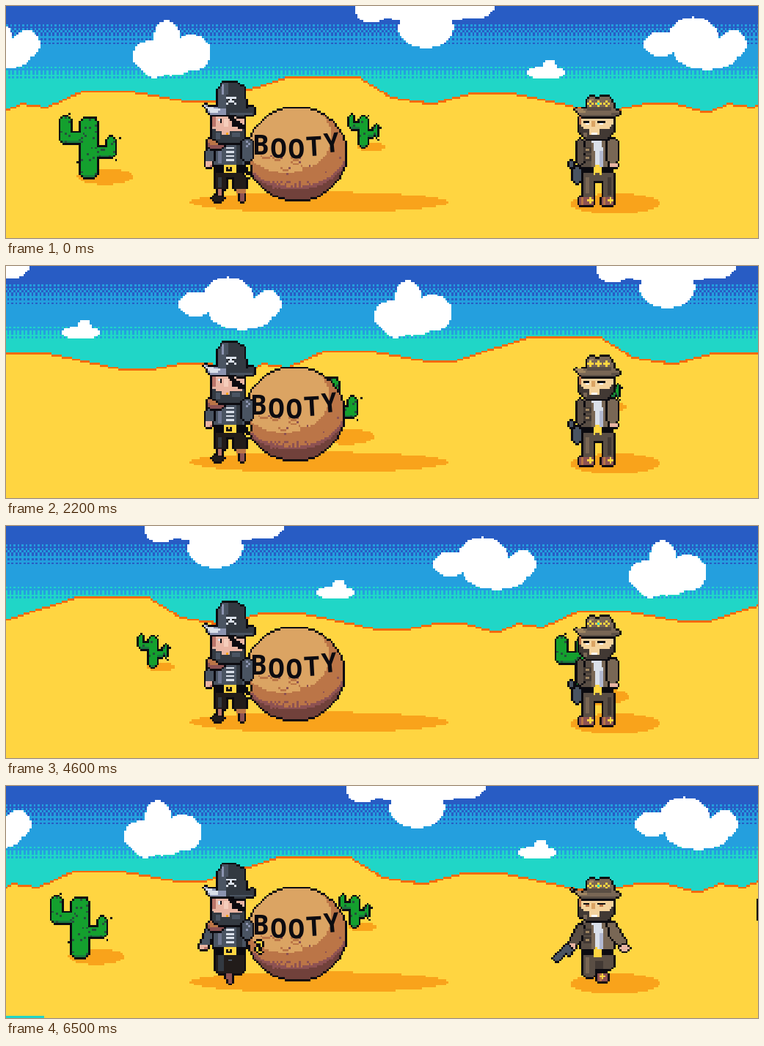
Recreate the animation shown at these times as an HTML page with a canvas. Size 1025 px wide and 317 px high, loop 6.52 s.

```html
<!DOCTYPE html>
<html lang="en">
<head>
<meta charset="utf-8">
<title>Desert walk</title>
<style>
html, body { margin: 0; width: 100%; height: 100%; overflow: hidden; background: #ffd541; }
canvas { display: block; width: 1025px; height: 317px; }
</style>
</head>
<body>
<canvas id="stage" width="1025" height="317"></canvas>
<script>
const LOOP = 6520, STEP = 100, PERIOD = 963;
const TILE_W = 350, S = PERIOD / TILE_W, W = 373, H = 116;   // art grid, S stage pixels per cell
const INK = '#0c0b10', SAND = '#ffd541', SHADE = '#f9a31b', TEAL = '#20d6c7';
const BLUE = '#249fde', NAVY = '#285cc4', SKIN = '#e9b5a3', BLUSH = '#ba756a', WHITE = '#fff';
const SLATE = '#4a5462', COAL = '#333941', STEEL = '#8b93af', PALE = '#dae0ea', PITCH = '#221c1a';
const COAT = '#5a4e44', UMBER = '#423934', TAN = '#796755', BUFF = '#a08662';
const WOOD = '#bb7547', LIGHT = '#dba463', RUST = '#8e5252', DARK = '#71413b';

const ctx = document.getElementById('stage').getContext('2d');
ctx.imageSmoothingEnabled = false;

let g, ox = 0, oy = 0;   // current layer and drawing offset in stage pixels
let seed = 7;
const rand = (lo, hi) => {
  seed = seed * 16807 % 2147483647;
  return lo + (hi - lo) * seed / 2147483647;
};

function layer() {
  const c = document.createElement('canvas');
  c.width = W;
  c.height = H;
  return c.getContext('2d');
}

function sprite(draw) {
  g = layer();
  ox = oy = 0;
  draw();
  return g.canvas;
}

// Later fills stay inside what the layer already holds
const clip = () => { g.globalCompositeOperation = 'source-atop'; };

const gx = x => Math.round((x + ox) / S), gy = y => Math.round((y + oy) / S);

function box(color, x1, y1, x2, y2) {
  const l = gx(x1), t = gy(y1);
  g.fillStyle = color;
  g.fillRect(l, t, Math.max(1, gx(x2) - l), Math.max(1, gy(y2) - t));
}

// Box without its four corner cells
function pad(color, x1, y1, x2, y2) {
  box(color, x1 + S, y1, x2 - S, y2);
  box(color, x1, y1 + S, x2, y2 - S);
}

const dot = (color, x, y) => box(color, x, y, x, y);

function plus(color, x, y) {
  box(color, x - S, y, x + 2 * S, y + S);
  box(color, x, y - S, x + S, y + 2 * S);
}

const points = text => text.split(' ').map(p => p.split(',').map(Number));

// Scanline fill with hard pixel edges
function fill(color, pts) {
  g.fillStyle = color;
  for (let row = 0; row < H; row++) {
    const y = (row + 0.5) * S - oy, xs = [];
    pts.forEach(([ax, ay], i) => {
      const [bx, by] = pts[(i + 1) % pts.length];
      if (ay <= y !== by <= y) xs.push(ax + (y - ay) / (by - ay) * (bx - ax));
    });
    xs.sort((a, b) => a - b);
    for (let i = 0; i + 1 < xs.length; i += 2) {
      const l = gx(xs[i]);
      g.fillRect(l, row, gx(xs[i + 1]) - l, 1);
    }
  }
}

const poly = (color, text) => fill(color, points(text));

function oval(color, cx, cy, rx, ry) {
  const pts = [];
  for (let t = 0; t < 2 * Math.PI; t += Math.PI / 24) pts.push([cx + rx * Math.cos(t), cy + ry * Math.sin(t)]);
  fill(color, pts);
}

// Draws a shape and rings it with a one-cell outline
function part(draw) {
  const out = g, body = layer(), ring = layer();
  g = body;
  draw();
  ring.drawImage(body.canvas, 0, 0);
  ring.globalCompositeOperation = 'source-in';
  ring.fillStyle = INK;
  ring.fillRect(0, 0, W, H);
  g = out;
  for (const [x, y] of [[1, 0], [-1, 0], [0, 1], [0, -1]]) g.drawImage(ring.canvas, x, y);
  g.drawImage(body.canvas, 0, 0);
}

// Dithered change between two sky bands
function blend(above, below, from, to) {
  const half = (to - from) / 2;
  for (let i = 0; i <= to - from; i++) {
    const upper = i < half;
    box(upper ? above : below, 0, (from + i) * S, W * S, (from + i + 1) * S);
    if (i === 1 || (!upper && i % 2 === 0)) continue;
    g.fillStyle = upper ? below : above;
    for (let x = i % 2; x < W; x += 2) g.fillRect(x, from + i, 1, 1);
  }
}

// A cloud is a row of overlapping puffs: x, y, rx, ry
function cloud(...puffs) {
  for (ox of [0, -PERIOD]) puffs.forEach(p => oval(WHITE, ...p));
  ox = 0;
}

function cactus(x, y, k) {
  oval(SHADE, x + 33 * k, y - k, 38 * k, 11 * k);
  part(() => {
    const limb = (a, b, c, d) => {
      pad('#14a02e', x + a * k, y + b * k, x + c * k, y + d * k);
      box('#1a7a3e', x + a * k + S, y + d * k - S, x + c * k - S, y + d * k);
    };
    limb(-27, -84, -14, -46);
    limb(35, -56, 47, -28);
    limb(-23, -61, 6, -46);
    limb(15, -41, 44, -28);
    limb(0, -81, 21, 0);
    clip();
    for (let i = 0; i < 70 * k * k; i++) dot('#24523b', x + rand(-28, 48) * k, y + rand(-84, 0) * k);
  });
  for (const [a, b] of [[-18, -88], [53, -55], [-5, -22], [20, -84], [46, -24]]) dot(INK, x + a * k, y + b * k);
}

const land = sprite(() => {
  box(NAVY, 0, 0, 1030, 9 * S);
  box(BLUE, 0, 9 * S, 1030, 30 * S);
  box(TEAL, 0, 30 * S, 1030, 320);
  blend(NAVY, BLUE, 9, 18);
  blend(BLUE, TEAL, 30, 35);

  cloud([573, -8, 89, 31], [572, 30, 38, 27], [498, 4, 23, 19], [640, 0, 26, 17]);
  cloud([736, 91, 26, 9], [741, 84, 10, 11]);
  cloud([219, 43, 18, 23], [196, 68, 23, 21], [252, 64, 27, 25], [203, 86, 16, 12], [224, 80, 30, 15]);
  cloud([892, 52, 22, 17], [937, 45, 35, 30], [955, 64, 44, 23], [991, 52, 18, 19]);

  const ridge = points('-1,143 22,134 55,139 104,117 168,117 250,131 283,130 380,99 480,97 525,125 580,134 ' +
    '635,120 692,120 790,141 835,141 870,134 912,134 955,145 966,142');
  for (const [color, dy] of [['#fa6a0a', -1.4], [SAND, 1.4]]) {
    oy = dy;
    fill(color, [...ridge, [966, 325], [-1, 325]]);
  }
  oy = 0;
  cactus(102, 234, 1);
  cactus(481, 193, 0.53);
});

const shadows = sprite(() => {
  oval(SHADE, 427, 268, 176, 14);
  oval(SHADE, 830, 270, 61, 14);
});

const boulder = sprite(() => part(() => {
  oval(DARK, 396.5, 202, 67, 63);
  clip();
  oval(RUST, 393, 194, 76, 57);
  oval(WOOD, 393, 190, 74, 57);
  oval(LIGHT, 382, 179, 62, 49);
  for (let i = 0; i < 30; i++) dot(RUST, rand(360, 412), rand(238, 249));
  // Small scallops in the bark
  for (let i = 0; i < 9; i++) {
    const x = rand(350, 446), y = rand(206, 234);
    box(WOOD, x, y, x + 9, y + S);
    dot(WOOD, x - S, y - S);
    dot(RUST, x + 9, y - S);
  }
}));

function pirate(stride) {
  if (stride) {
    part(() => {
      box(RUST, 301, 250, 309, 264);
      box(RUST, 304, 262, 307, 269);
      pad(PITCH, 285, 226, 325, 256);
    });
    box(COAL, 290, 232, 296, 252);
    box(SLATE, 303, 236, 309, 239);
  } else {
    part(() => {
      box(BLUSH, 288, 250, 295, 262);
      pad(PITCH, 280, 260, 297, 268);
      box(RUST, 319, 252, 324, 268);
      box(PITCH, 285, 226, 327, 234);
      box(PITCH, 285, 226, 300, 250);
      box(PITCH, 311, 226, 327, 250);
    });
    box(COAL, 288, 234, 294, 248);
    box(WOOD, 314, 251, 328, 257);
  }
  oy = stride ? 3 : 0;

  // Coat, shirt and arms
  part(() => pad(SLATE, 284, 182, 327, 222));
  box(COAL, 314, 188, 322, 220);
  for (let y = 187; y < 213; y += 2 * S) {
    box(PALE, 299, y, 312, y + S);
    box(SLATE, 299, y + S, 312, y + 2 * S);
  }
  box('#6d758d', 289, 198, 294, 214);
  const lean = stride ? -7 : 0;
  part(() => {
    poly(SLATE, `275,190 285,190 ${284 + lean},213 ${272 + lean},213`);
    box(SKIN, 272 + lean, 213, 281 + lean, 221);
  });
  box(BLUSH, 277 + lean, 217, 282 + lean, 221);
  part(() => {
    pad(RUST, 274, 180, 296, 194);
    pad(WOOD, 274, 180, 294, 190);
  });
  part(() => pad(SLATE, 322, 182, 336, stride ? 207 : 212));
  for (let i = 0; i < 3; i++) dot(STEEL, 327 + 3 * (i % 2), 185 + 3 * i);

  // Hook
  const hx = stride ? 17 : 0, hy = stride ? -8 : 0;
  part(() => {
    box(SAND, 324 + hx, 216 + hy, 332 + hx, 219 + hy);
    box(SAND, 329 + hx, 219 + hy, 332 + hx, 226 + hy);
    box(SAND, 324 + hx, 225 + hy, 327 + hx, 231 + hy);
    box(SAND, 327 + hx, 230 + hy, 333 + hx, 233 + hy);
  });

  // Belt
  box(INK, 283, 216, 327, 227);
  box(SAND, 297, 216, 313, 229);
  box(INK, 301, 219, 309, 225);
  dot(SAND, 304, 220);

  // Head
  part(() => {
    box(SKIN, 282, 148, 324, 172);
    poly(COAL, '279,164 287,171 322,171 326,164 324,181 315,188 292,188 282,181');
  });
  box(BLUSH, 281, 150, 286, 164);
  box(PALE, 288, 155, 294, 158);
  box(INK, 291, 155, 294, 160);
  box('#f5cdbb', 296, 155, 302, 166);
  poly(INK, '300,150 306,150 325,163 325,168 318,167');
  box(INK, 308, 156, 319, 166);
  box(SLATE, 287, 174, 293, 182);
  box(SLATE, 309, 174, 318, 179);
  box(SKIN, 295, 169, 306, 176);
  box(SHADE, 299, 172, 304, 176);

  // Hat
  part(() => {
    poly(COAL, '290,142 290,114 296,104 312,104 325,112 327,142');
    poly(SLATE, '290,142 290,114 296,104 303,104 299,142');
    poly(COAL, '270,135 302,142 339,138 339,148 318,151 300,147 278,148');
    poly(STEEL, '270,135 302,142 298,148 278,148');
    poly(PALE, '270,135 292,142 286,147 278,146');
  });
  box(STEEL, 294, 108, 297, 122);
  box(SLATE, 306, 145, 336, 148);
  box(PALE, 302, 123, 310, 133);
  for (const x of [299, 310]) for (const y of [124, 133]) dot(PALE, x, y);
  for (const x of [302, 308]) dot(INK, x, 127);
}

function cowboy(stride, gems) {
  const boot = (x1, x2, y) => {
    box(RUST, x1, y, x2, y + 10);
    box(WOOD, x1 + S, y, x1 + 2 * S, y + 10);
  };
  if (stride) {
    part(() => {
      boot(805, 820, 256);
      pad(COAT, 788, 228, 827, 250);
      pad(COAT, 788, 228, 803, 261);
    });
    box(UMBER, 803, 238, 814, 250);
    plus(SAND, 811, 259);
  } else {
    part(() => {
      box(COAT, 787, 228, 828, 240);
      box(COAT, 787, 228, 800, 262);
      box(COAT, 814, 228, 828, 262);
      boot(782, 800, 262);
      boot(811, 828, 262);
    });
    box(UMBER, 820, 234, 825, 260);
    for (const x of [794, 822]) plus(SAND, x, 263);
  }
  box(TAN, 791, 234, 794, 257);
  oy = stride ? 3 : 0;

  // Coat, shirt and arms
  part(() => {
    pad(TAN, 784, 181, 829, 223);
    box(COAT, 784, 184, 799, 220);
  });
  poly(PALE, '798,183 812,183 816,221 803,221 803,200');
  box('#b3b9d1', 809, 198, 814, 220);
  part(() => {
    if (stride) {
      poly(COAT, '781,184 788,190 784,206 776,216 768,210');
      box(SKIN, 767, 211, 775, 219);
    } else pad(COAT, 780, 182, 787, 216);
  });
  for (const y of [193, 203]) {
    box(UMBER, 787, y, 797, y + 8);
    box(BUFF, 789, y + 2, 795, y + 4);
  }
  part(() => {
    if (stride) {
      poly(TAN, '820,183 829,183 845,210 837,215 824,202');
      pad(SKIN, 836, 213, 850, 222);
    } else {
      pad(TAN, 821, 181, 833, 215);
      box(SKIN, 823, 214, 834, 221);
    }
  });
  part(() => {
    if (stride) poly(SLATE, '764,214 773,220 768,229 763,226 752,238 746,233');
    else {
      pad(SLATE, 774, 219, 783, 243);
      box(SLATE, 769, 213, 774, 220);
    }
  });

  // Belt
  box(INK, 785, 221, 829, 229);
  poly(SAND, '806,216 809,221 815,222 810,226 813,232 806,229 799,232 802,226 797,222 803,221');

  // Head
  part(() => {
    box('#f4d29c', 781, 150, 827, 168);
    poly(UMBER, '780,161 788,168 820,168 829,161 827,174 818,181 790,181 782,174');
  });
  box(WOOD, 781, 150, 785, 162);
  box(WOOD, 785, 150, 824, 153);
  for (const x of [787, 807]) {
    box(INK, x, 156, x + 9, 159);
    box(stride ? WOOD : WHITE, x + 2, 159, x + 8, 161);
  }
  box(LIGHT, 799, 157, 804, 166);
  box(TAN, 788, 172, 793, 179);
  box('#f4d29c', 795, 168, 808, 176);
  box(WHITE, 798, 172, 806, 175);

  // Hat
  part(() => {
    poly(TAN, '791,142 792,129 798,123 806,126 814,123 822,125 827,131 827,142');
    poly(TAN, '771,138 780,142 826,138 838,146 830,151 785,151');
    box(COAT, 792, 138, 826, 142);
    poly(COAT, '782,148 837,147 830,151 785,151');
  });
  poly(BUFF, '773,139 792,143 789,147 779,146');
  box(BUFF, 796, 126, 802, 130);
  for (const x of [794, 806, 817]) {
    plus(SAND, x, 132);
    if (gems) dot(x === 806 ? TEAL : TAN, x, 132);
  }
}

const poses = [false, true];
const pirates = poses.map(b => sprite(() => pirate(b)));
const cowboys = poses.map(gems => poses.map(b => sprite(() => cowboy(b, gems))));

function drawWord(dx) {
  ctx.font = '700 37px "Noto Sans Mono", "DejaVu Sans Mono", monospace';
  ctx.textAlign = 'center';
  ctx.fillStyle = INK;
  [...'BOOTY'].forEach((ch, i) => {
    ctx.save();
    ctx.translate(347 + 24.5 * i + dx, 203 + 5.5 * Math.sin(i * 0.95));
    ctx.rotate(-0.006 * i * i);
    ctx.fillText(ch, 0, 0);
    ctx.restore();
  });
}

const put = (img, dx = 0) => ctx.drawImage(img, dx, 0, W * S, H * S);

function render(time) {
  const step = Math.floor(time % LOOP / STEP);
  const scroll = step ? Math.round(10.8 + 14.464 * step) : 0;
  for (let x = scroll - PERIOD; x < 1025; x += PERIOD) {
    ctx.drawImage(land, 0, 0, TILE_W, H, x, 0, PERIOD, H * S);
  }
  ctx.fillStyle = TEAL;
  ctx.fillRect(0, 314, Math.max(0, scroll - 899), 3);

  put(shadows);
  const roll = step % 4 < 2 ? 0 : -3;
  put(boulder, roll);
  drawWord(roll);
  const stride = step % 2;
  put(pirates[stride]);
  put(cowboys[step < 5 || step > 45 ? 1 : 0][stride]);
}

const start = performance.now();
function tick() {
  render(performance.now() - start);
  requestAnimationFrame(tick);
}
tick();
</script>
</body>
</html>
```
